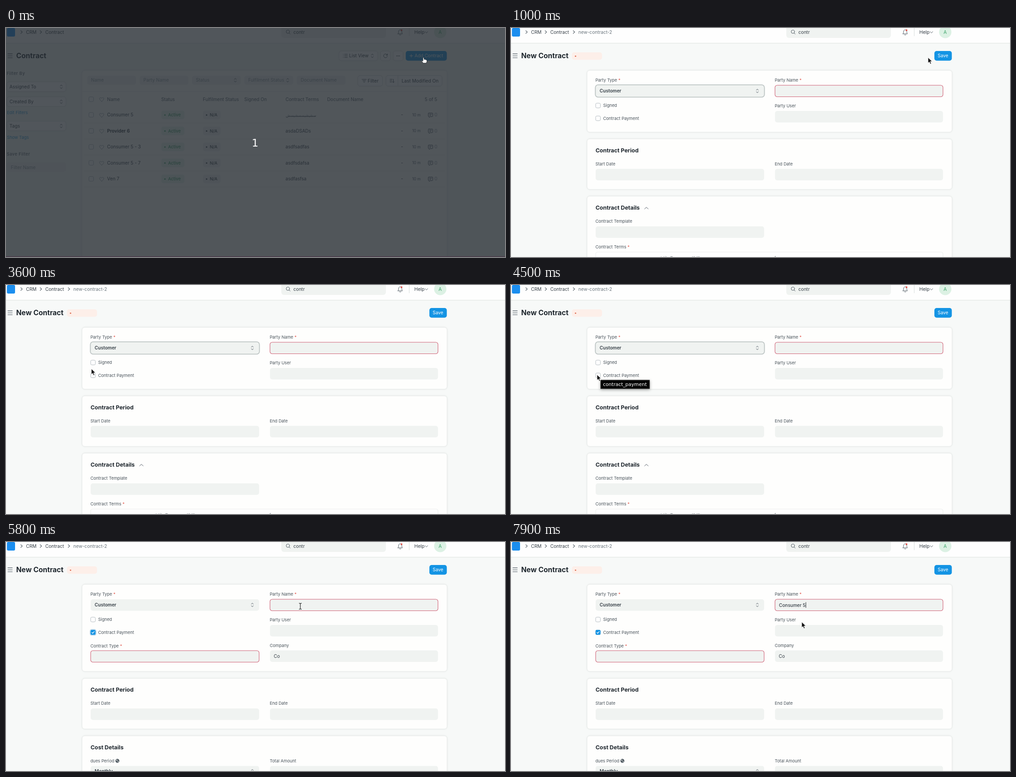
Recreate the animation shown at these times as an HTML page. Size 1102x508 px, loop 8000 ms.

```html
<!DOCTYPE html>
<html lang="en">
<head>
<meta charset="utf-8">
<title>Contract form</title>
<style>
html, body { margin: 0; width: 100%; height: 100%; overflow: hidden; background: #f7f9f8; }
svg { display: block; width: 1102px; height: 508px; font-family: Inter, sans-serif; }
text { white-space: pre; }
.card { fill: #fefefd; stroke: #e9ecea; filter: drop-shadow(0 .5px 1.5px rgba(30, 45, 40, .1)); }
.btn { fill: #fefefe; stroke: #d9dddc; filter: drop-shadow(0 .6px .6px rgba(30, 45, 40, .12)); }
.line { fill: none; stroke: #4c5760; stroke-linecap: round; stroke-linejoin: round; }
.menu { fill: #fefefe; stroke: #e5e8e7; filter: drop-shadow(0 2px 4px rgba(30, 45, 40, .16)); }
.tip { filter: drop-shadow(0 2px 3px rgba(0, 0, 0, .35)); }
</style>
</head>
<body>
<svg id="stage" viewBox="0 0 1102 508"></svg>
<script>
const LOOP = 8000;
const S = 9.36, M = 10.08;
const DARK = '#343d45', LABEL = '#48525a', MUTED = '#8d979e', FIELD = '#f0f3f1',
      BLUE = '#1494e4', RED = '#e2574c', LINE = '#eceeed';

// Text is placed by its left ink edge and the middle of its capitals.
function text(x, y, str, size = M, fill = DARK, opt = '') {
  return `<text x="${x - size * 0.065}" y="${y + size * 0.363}" font-size="${size}" fill="${fill}" ${opt}>${str}</text>`;
}
const bold = 'font-weight="700"', semi = 'font-weight="600"', medium = 'font-weight="500"';

function rect(x1, y1, x2, y2, r, attrs) {
  return `<rect x="${x1}" y="${y1}" width="${x2 - x1}" height="${y2 - y1}" rx="${r}" ${attrs}/>`;
}
function icon(x, y, d, attrs = '') {
  return `<path class="line" transform="translate(${x} ${y})" d="${d}" ${attrs}/>`;
}
const dot = (x, y, r, fill) => `<circle cx="${x}" cy="${y}" r="${r}" fill="${fill}"/>`;
const rule = (x1, x2, y) => `<path d="M${x1} ${y}H${x2}" stroke="${LINE}"/>`;
const card = (y1, y2) => rect(168, y1, 974, y2, 6, 'class="card"');
const button = (x1, y1, x2, y2) => rect(x1, y1, x2, y2, 5, 'class="btn"');
const updown = (x, y) => icon(x, y, 'M-2.3 -1.8L0 -4L2.3 -1.8M-2.3 1.8L0 4L2.3 1.8');
const chevron = x => icon(x, 9, 'M-1.7 -3.2L1.7 0L-1.7 3.2', 'stroke-width="1.1"');
const checkbox = (x, y) => rect(x, y - 5.2, x + 10.4, y + 5.2, 2.6, 'fill="#fefefe" stroke="#b4bcc1"');
const heart = (x, y) => icon(x, y, 'M0 4.6C-8 -.6 -4.2 -6.6 0 -2.6C4.2 -6.6 8 -.6 0 4.6Z', 'stroke="#9aa4ab" style="stroke:#9aa4ab"');

function badge(x1, x2, y, h, str, bg, fg, opt = medium) {
  return rect(x1, y - h / 2, x2, y + h / 2, 5, `fill="${bg}"`) +
    dot(x1 + 8, y + 0.3, 1.6, fg) + text(x1 + 15.5, y, str, S, fg, opt);
}
function label(x, y, str, required) {
  const star = required ? `<tspan fill="${RED}"> *</tspan>` : '';
  return text(x, y, str + star, S, LABEL);
}
function field(col, y, required) {
  const [a, b] = col ? [583, 954] : [187, 559];
  return rect(a, y, b, y + 25.5, 5, `fill="${FIELD}"` + (required ? ' stroke="#cf5f74" stroke-width="1.1"' : ''));
}

function navbar() {
  return rect(0, -10, 1102, 33, 0, 'fill="#fefefe"') +
    '<path d="M0 33.5H1102" stroke="#e4e8e6"/><path d="M0 34.5H1102" stroke="#f1f4f2"/>' +
    rect(2, 0, 20, 19, 3, 'fill="#1b8eef"') +
    chevron(34.3) + text(45, 9, 'CRM') + chevron(77) + text(87.5, 9, 'Contract') +
    rect(608, -8, 839, 22, 6, `fill="${FIELD}"`) +
    icon(623, 9, 'M3.2 -.8A3.7 3.7 0 1 1 -4.2 -.8A3.7 3.7 0 1 1 3.2 -.8M2.2 2L4.6 4.5') +
    text(635.5, 9.5, 'contr') +
    icon(870.5, 9.5, 'M-5 3.4H5C3.2 1.6 3.9 -.4 3.4 -2.6C2.6 -6.4 -2.6 -6.4 -3.4 -2.6C-3.9 -.4 -3.2 1.6 -5 3.4ZM-1.6 5.6Q0 7 1.6 5.6') +
    dot(873.5, 4.8, 1.9, '#e0463e') +
    '<path d="M890.5 0V18" stroke="#d9dddc"/>' +
    text(902.5, 9, 'Help', 10.3) + icon(928.5, 9.5, 'M-3 -1.4L0 1.4L3 -1.4') +
    dot(959, 9, 13.6, '#dcf1e4') + text(955.9, 9.3, 'A', 10.2, '#3ea56a') +
    icon(9, 61.7, 'M-5 -4.3H5M-5 0H5M-5 4.3H5', 'stroke-width="1.1"');
}

function sidebar() {
  const spaced = medium + ' letter-spacing=".45"';
  const pick = (y, str) => button(2, y - 10.8, 132.5, y + 10.8) + text(8.5, y, str) + updown(122, y);
  return text(2, 100.5, 'Filter By', S, '#5a656d', spaced) +
    pick(130.3, 'Assigned To') + pick(163.5, 'Created By') +
    text(2.5, 188, 'Edit Filters', S, '#259bd8') +
    pick(217.3, 'Tags') + text(2.5, 242.7, 'Show Tags', S, '#259bd8') +
    text(2, 279.7, 'Save Filter', S, '#5a656d', spaced) +
    rect(1.5, 298, 132.5, 319, 5, `fill="${FIELD}"`) + text(11.5, 309, 'Filter Name', M, MUTED);
}

function row(name, terms, i) {
  const y = 192.7 + i * 35.5;
  const gibberish = i === 0;
  return checkbox(183, y) + heart(211.3, y + 0.5) +
    text(224, y - 0.2, name, M, i === 1 ? '#1f272e' : DARK, i === 1 ? semi : '') +
    badge(343, 394, y, 19, 'Active', '#e6f5ec', '#3c9f66') +
    badge(435, 474, y, 19, 'N/A', '#f0f3f2', DARK) +
    (gibberish
      ? text(618.5, y + 1, terms, 8, DARK, 'font-family="DejaVu Sans, sans-serif" direction="ltr"')
      : text(618, y, terms)) +
    text(873, y, '-') + text(897.5, y, '10 m', 8.6, '#5b666e') +
    icon(937.5, y + 0.7, 'M-3.6 -4.8H3.6Q5 -4.8 5 -3.4V1.8Q5 3.2 3.6 3.2H-.6L-2.8 5V3.2H-3.6Q-5 3.2 -5 1.8V-3.4Q-5 -4.8 -3.6 -4.8ZM-2.5 -2.2H2.5M-2.5 .5H1') +
    text(947, y, '0', M, '#929ca3') + rule(172, 970, Math.round(y + 17.3) + 0.5);
}

function listPage() {
  const filters = ['Name', 'Party Name', 'Status', 'Fulfilment Status', 'Document Name'];
  const heads = [[224, 'Name'], [343.5, 'Status'], [435.5, 'Fulfilment Status'], [527, 'Signed On'],
    [618, 'Contract Terms'], [710, 'Document Name'], [925.5, '5 of 5']];
  const rows = [['Consumer 5', 'سشيشيسسشيسش'], ['Provider 6', 'asdaDSADs'], ['Consumer 5 - 3', 'asdfsadfas'],
    ['Consumer 5 - 7', 'asdfsdafsa'], ['Ven 7', 'asdfasfsa']];
  return text(23.5, 61.5, 'Contract', 15.6, '#1f272e', bold) +
    button(735.5, 51, 821, 72.5) +
    icon(749.5, 61.7, 'M-1.8 -3.5H4.5M-1.8 0H4.5M-1.8 3.5H4.5M-4.7 -3.5h.2M-4.7 0h.2M-4.7 3.5h.2', 'stroke-width="1.1"') +
    text(758.5, 61.7, 'List View') + updown(809, 61.7) +
    button(827, 51, 849, 72.5) +
    icon(838, 61.7, 'M4 -1.6A4.2 4.2 0 1 0 4.2 1M4.4 -4.4V-1.5H1.5') +
    button(855, 51, 877, 72.5) +
    [-3, 0, 3].map(d => dot(866 + d, 61.9, 0.9, DARK)).join('') +
    `<g id="add">${rect(882.8, 51, 973.5, 72.5, 5, `fill="${BLUE}"`)}</g>` +
    icon(895, 61.7, 'M-3.3 0H3.3M0 -3.3V3.3', 'style="stroke:#fff"') +
    text(903, 61.7, 'Add Contract', M, '#fff') +
    sidebar() + card(94, 530) +
    filters.map((str, i) => {
      const x = 179.5 + i * 115.7;
      return rect(x, 106, x + 107.5, 126, 5, `fill="${FIELD}"`) + text(x + 9, 115.8, str, M, MUTED) +
        (i === 2 || i === 3 ? updown(x + 95.5, 115.8) : '');
    }).join('') +
    button(777, 105.5, 831.5, 129) + icon(791, 117, 'M-4.8 -3H4.8M-3 0H3M-1.2 3H1.2') + text(799.5, 117.2, 'Filter') +
    button(839, 105.5, 963, 129) + '<path d="M865.5 105.5V129" stroke="#d9dddc"/>' +
    icon(852.5, 117.2, 'M-4.6 -3.4H.6M-4.6 -.4H-.6M-4.6 2.6H-.6M3 -3.6V3.8M.9 1.8L3 3.8L5 1.8') +
    text(874.5, 117.2, 'Last Modified On') +
    rule(168, 974, 140.5) + checkbox(183, 158) + heart(211.3, 158.3) +
    heads.map(([x, str]) => text(x, 158, str, M, '#515c64')).join('') +
    rows.map(([name, terms], i) => row(name, terms, i)).join('');
}

function periodCard(y) {
  return card(y, y + 112) + text(187.5, y + 25, 'Contract Period', 12.4, '#1f272e', bold) +
    label(187, y + 55.3, 'Start Date') + label(583, y + 55.3, 'End Date') +
    field(0, y + 66.5) + field(1, y + 66.5);
}

function shortForm() {
  const toolbar = [[331, 'ld'], [340, 'it'], [352, 'T'], [361, 'rm'], [385, 'm'], [399, '“”'], [409, '“”'],
    [434, 'w'], [449, 'm n'], [498, 'n'], [516, 'm'], [538, 'n'], [582, 'f'], [592, 'mx'], [622, 'm']];
  return card(94, 231) + periodCard(246) + card(373, 530) +
    text(187.5, 398.5, 'Contract Details', 12.4, '#1f272e', bold) +
    icon(299, 399.5, 'M-4 2L0 -2L4 2') +
    label(187, 428.7, 'Contract Template') + field(0, 440) +
    label(187, 485.7, 'Contract Terms', true) +
    rect(187, 497, 954, 530, 4, `fill="#fefefe" stroke="${LINE}"`) +
    toolbar.map(([x, str]) => text(x, 510.5, str, S, '#555f66')).join('');
}

function longForm() {
  return card(94, 287) + label(187, 230.7, 'Contract Type', true) + field(0, 241, true) +
    label(583, 229.2, 'Company') + field(1, 240.5) + text(592, 253.4, 'Co') +
    periodCard(302.7) + card(430, 540) +
    text(187.5, 455.3, 'Cost Details', 12.4, '#1f272e', bold) +
    label(187, 485.7, 'dues Period') + label(583, 485.7, 'Total Amount') +
    dot(246, 485.5, 4.4, '#555f66') +
    '<path d="M243.2 483.6l2.2 -.8l.8 1.7l-1.6 1.2zM246.8 486.4l2 -.6l-.6 2.2l-1.4 .6z" fill="#dfe3e2"/>' +
    field(0, 496.7) + field(1, 496.7) + text(196.5, 508.8, 'Monthly', M, DARK, semi) + updown(544, 508.5);
}

function formTop() {
  return chevron(139) + text(149.5, 9, 'new-contract-2', M, '#69747c') +
    text(23.5, 61.5, 'New Contract', 15.6, '#1f272e', bold) +
    badge(134.5, 201, 62.2, 16.5, 'Not Saved', '#fdefe9', '#df7359', '') .replace('x="149.3', 'x="148') +
    rect(935, 51, 973.5, 72.5, 5, `fill="${BLUE}"`) + text(943, 61.7, 'Save', M, '#fff');
}

function formFields() {
  return label(187, 115.6, 'Party Type', true) + field(0, 127) +
    `<g id="ring">${rect(186.3, 126.2, 559.7, 153.4, 6, 'fill="none" stroke="#bcc4c3" stroke-width="1.8"')}</g>` +
    text(196.5, 139.6, 'Customer', M, DARK, semi) + updown(544, 139.6) +
    label(583, 115.6, 'Party Name', true) + field(1, 127, true) +
    `<g id="value">${text(592.5, 140, 'Consumer 5', M, DARK, medium)}</g>` +
    `<path id="caret" stroke="#22282d" d="M0 133.5V146"/>` +
    checkbox(187, 172) + text(204, 172, 'Signed', S, LABEL) +
    checkbox(187, 200.4) + text(204, 200.4, 'Contract Payment', S, LABEL) +
    '<g id="tick">' +
    `<g id="tickRing">${rect(185.6, 193.8, 198.8, 207, 4, 'fill="none" stroke="#b9d9ee" stroke-width="1.6"')}</g>` +
    rect(186.8, 195, 197.6, 205.8, 2.6, `fill="${BLUE}"`) +
    icon(192.2, 200.5, 'M-2.6 .1L-.8 2L2.7 -1.9', 'style="stroke:#fff" stroke-width="1.3"') + '</g>' +
    label(583, 172.6, 'Party User') + field(1, 184);
}

function menu() {
  const items = ['Consumer 5', 'Consumer 5 - 3', 'Consumer 5 - 7', '+ Create a new Customer', 'Advanced Search'];
  return rect(583, 156.5, 954, 311, 5, 'class="menu"') +
    `<g id="hover">${rect(587, 161, 950, 189, 5, `fill="${FIELD}"`)}</g>` +
    items.map((str, i) => text(594, 175 + i * 29.4, str, M, DARK, i < 3 ? semi : '')).join('');
}

const cursors = {
  arrow: '<path d="M0 0V12.2L2.9 9.7L5 14.4L7.1 13.5L5 8.9L8.8 8.6Z" fill="#111" stroke="#fff" stroke-width=".8"/>',
  hand: '<path d="M-1.2 .8Q0 -1.2 1.2 .8V4.2Q2.6 3.4 3.6 4.6Q5 3.9 5.8 5.2Q7.6 4.8 7.6 6.6V8.8L6.2 12.4H-.6L-4 8Q-3.8 6.2 -1.2 7.8Z" fill="#fff" stroke="#1c2126" stroke-width=".9" stroke-linejoin="round"/>',
  beam: '<path d="M-3 -6.5Q-.4 -6.8 0 -5.4Q.4 -6.8 3 -6.5M0 -5.4V5.4M-3 6.5Q-.4 6.8 0 5.4Q.4 6.8 3 6.5" fill="none" stroke="#222" stroke-width="1.2"/>'
};

const $ = id => document.getElementById(id);
const group = (id, body) => `<g id="${id}">${body}</g>`;

$('stage').innerHTML =
  rect(0, 0, 1102, 508, 0, 'fill="#f7f9f8"') + navbar() +
  group('list', listPage()) +
  group('form', formTop() + group('short', shortForm()) + group('long', longForm()) + formFields() + group('menu', menu())) +
  group('tip', rect(198, 211, 306, 230, 0, 'class="tip" fill="#050505" stroke="#333"') +
    text(204, 220.3, 'contract_payment', 10.6, '#fff', 'font-family="DejaVu Sans, sans-serif"')) +
  group('veil', rect(0, 0, 1102, 508, 0, 'fill="#262c32" fill-opacity=".8"') +
    rect(0, 506.5, 1102, 508, 0, 'fill="#4b3b4a"') +
    '<text x="550" y="262.5" font-size="23" fill="#fff" text-anchor="middle" font-family="DejaVu Sans, sans-serif">1</text>') +
  group('cursor', Object.keys(cursors).map(k => group(k, cursors[k])).join(''));

// Pointer steps: time, x, y, shape.
const path = [
  [0, 922, 65.5, 'hand'], [1000, 921, 65.5, 'arrow'], [1300, 818, 98, 'arrow'], [1400, 711, 132, 'beam'],
  [1600, 335, 134.5, 'arrow'], [1800, 315, 137], [1900, 295, 139], [2000, 278, 139.5], [2100, 267, 139],
  [2400, 208.5, 170], [2500, 199, 174], [2600, 191, 176.5], [2700, 186.5, 176.5],
  [2900, 190, 177], [3000, 193, 177], [3100, 189, 177], [3600, 188.5, 186], [3700, 190, 203], [3800, 190, 199],
  [5500, 440, 160], [5600, 682, 115.5], [5800, 650, 142.5, 'beam'],
  [7300, 648, 152, 'arrow'], [7400, 645, 168], [7500, 642, 177.5]
].reduce((all, [t, x, y, kind]) => [...all, { t, x, y, kind: kind || all[all.length - 1].kind }], []);

// Visible spans in ms.
const spans = {
  veil: [0, 300], list: [0, 1000], form: [1000, LOOP], ring: [1000, 4900], short: [1000, 5000], long: [5000, LOOP],
  tip: [4500, 4900], tick: [4900, LOOP], tickRing: [4900, 6300], menu: [7200, 7900], hover: [7400, 7900], value: [7800, LOOP]
};

const show = (id, on) => $(id).setAttribute('visibility', on ? 'visible' : 'hidden');
for (const id in spans) $(id).removeAttribute('visibility');
const addBox = $('add').firstElementChild;
const caretEnd = 592 + $('value').firstElementChild.getComputedTextLength() + 0.6;

function draw(now) {
  const t = now % LOOP;
  for (const id in spans) {
    const [from, to] = spans[id];
    $(id).style.display = t >= from && t < to ? '' : 'none';
  }
  const pressed = t >= 700;
  addBox.setAttribute('fill', pressed ? '#1184cf' : BLUE);
  addBox.setAttribute('stroke', pressed ? '#a9d6f3' : 'none');
  addBox.setAttribute('stroke-width', 2);

  const filled = t >= 7800;
  show('caret', filled || (t >= 6300 && t < 6700) || t >= 7200);
  $('caret').setAttribute('transform', `translate(${filled ? caretEnd : 593.5} 0)`);

  const at = path.filter(p => p.t <= t).pop();
  $('cursor').setAttribute('transform', `translate(${at.x} ${at.y})`);
  for (const kind in cursors) show(kind, kind === at.kind);
}

let start = null;
function tick(now) {
  if (start === null) start = now;
  draw(now - start);
  requestAnimationFrame(tick);
}
draw(0);
requestAnimationFrame(tick);
</script>
</body>
</html>
```
